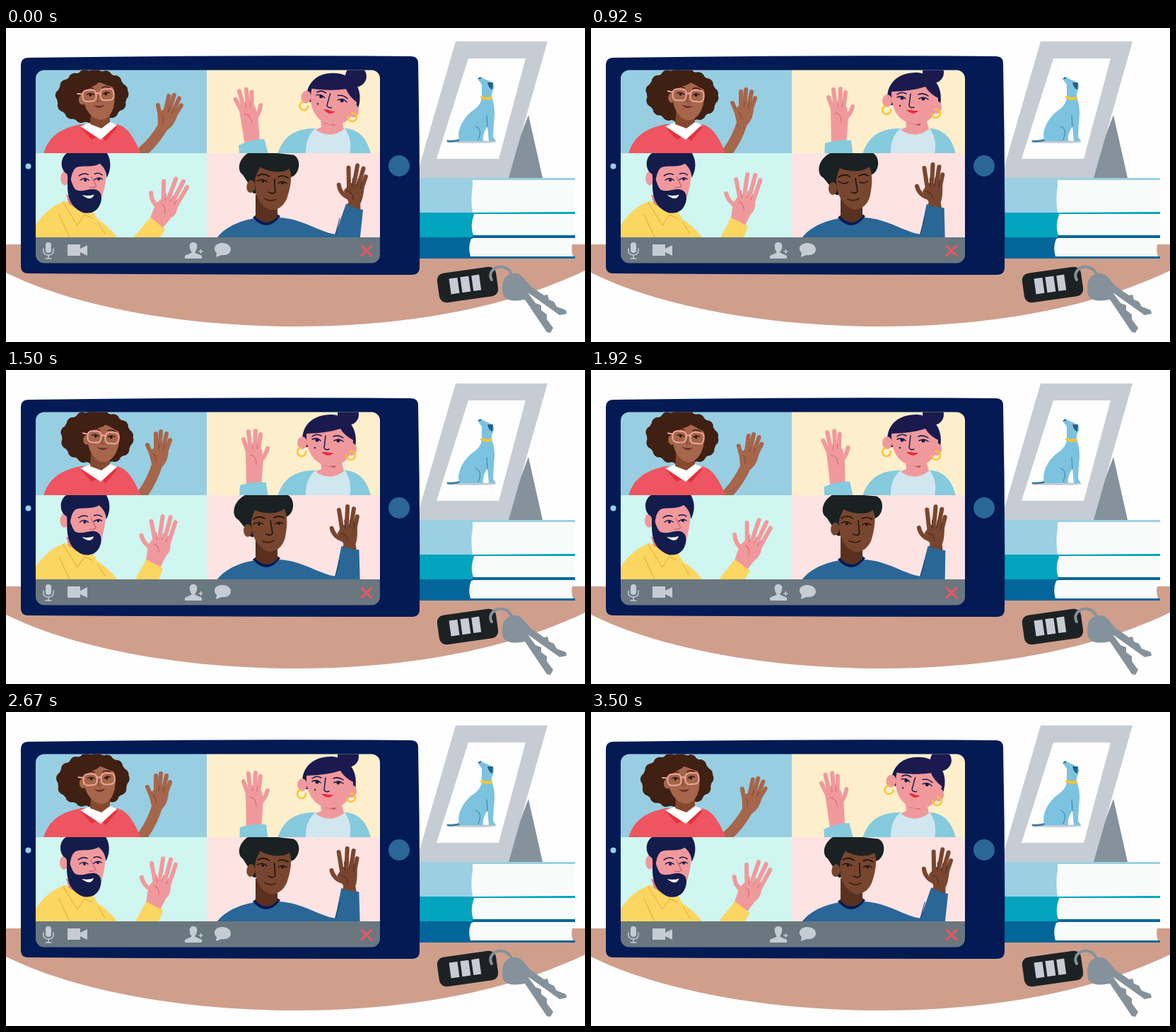
Recreate the animation shown at these times as an HTML page. Size 819 by 444 pixels, loop 3540 ms.

```html
<!DOCTYPE html>
<html lang="en">
<head>
<meta charset="utf-8">
<title>Video call</title>
<style>
html, body { margin: 0; width: 100%; height: 100%; overflow: hidden; background: #fefefe; }
svg { display: block; width: 819px; height: 444px; }
.line { fill: none; stroke-linecap: round; stroke-linejoin: round; }
.fingers { fill: none; stroke-linecap: round; stroke-width: 6; }
.dark { stroke: #141c4c; stroke-width: 1.5; }
</style>
</head>
<body>
<svg viewBox="0 0 819 444">
<defs>
  <clipPath id="screen"><rect x="42" y="59.5" width="487" height="273" rx="12"/></clipPath>
  <clipPath id="c1"><path d="M42 59H284V177H42z"/></clipPath>
  <clipPath id="c2"><path d="M284 58H529V177H284z"/></clipPath>
  <clipPath id="c3"><path d="M42 177H284V296H42z"/></clipPath>
  <clipPath id="c4"><path d="M284 177H529V296H284z"/></clipPath>
</defs>

<!-- Desk -->
<path fill="#cf9f8c" d="M0 306H819V343C700 400 550 422 410 422S110 400 0 346z"/>

<!-- Picture frame -->
<path fill="#85929b" d="M739 123L759 212H705z"/>
<path fill="#c5ccd4" d="M636 19H766L711 212H580z"/>
<path fill="#fefefe" d="M654 43H735L697 185H609z"/>
<ellipse cx="661" cy="161" rx="33" ry="2" fill="#c5ccd4"/>
<path class="line" stroke="#3b7ea1" stroke-width="3" d="M645 157Q636 161 625 160"/>
<path fill="#7cc3df" d="M667 72L672 69C677 74 688 74 690 81C691 87 686 90 687 98C691 108 692 120 690 134L689 154L693 160H683L681 139C676 147 674 153 675 160H642C636 148 646 127 660 117C669 111 674 104 673 93L673 80z"/>
<path class="line" stroke="#3b7ea1" d="M664 139Q675 142 668 158M680 124L681 140"/>
<path fill="#2b5f86" d="M681 77L689 77L688 87Q683 86 681 77zM667 72L671 69L672 72z"/>
<path class="line" stroke="#f7c531" stroke-width="4" d="M673 98Q680 101 686 99"/>

<!-- Books -->
<path fill="#9ad0e2" d="M580 212H805V215H660V262H580z"/>
<path fill="#f9fafa" d="M662 215H805V260H660Q656 238 662 215z"/>
<path fill="#02a4be" d="M580 261H660L805 260V263H662V296H580z"/>
<path fill="#f9fafa" d="M662 264H805V293H661Q656 279 662 264z"/>
<path fill="#02669a" d="M580 296H660V293H805V297H660V323H805V326H580z"/>
<path fill="#f9fafa" d="M658 298H805V306H801Q799 315 802 323H657Q653 310 658 298z"/>

<!-- Keys -->
<g transform="rotate(-8 653 363)">
  <rect x="611" y="342" width="84" height="42" rx="10" fill="#1c2224"/>
  <path fill="#c5ccd4" d="M628 351H640V373H628zM644 351H656V373H644zM660 351H671V373H660z"/>
</g>
<path class="line" stroke="#85929b" stroke-width="4" d="M687 356C681 345 692 336 703 338C714 341 718 350 714 360"/>
<path fill="#85929b" d="M706 353C713 345 724 345 731 352L742 365L761 378L766 377L768 384L775 387L779 394L792 399L793 404L783 406L738 374L749 389L757 392L757 399L765 405L765 412L774 424L770 431L765 430L734 384C724 386 707 388 703 377C701 367 702 358 706 353z"/>

<!-- Tablet -->
<path fill="#031a54" d="M32 42Q300 38 573 40Q583 40 583 50Q586 195 585 338Q585 349 574 349Q300 349 31 347Q21 347 21 336V53Q21 42 32 42z"/>
<circle cx="31.500" cy="195.500" r="4" fill="#9ad0e2"/>
<circle cx="556" cy="195" r="15" fill="#2a6796"/>

<g clip-path="url(#screen)">
  <path fill="#98cee1" d="M42 59H284V177H42z"/>
  <path fill="#fdefcb" d="M284 59H529V177H284z"/>
  <path fill="#cff6f0" d="M42 177H284V296H42z"/>
  <path fill="#fde3e2" d="M284 177H529V296H284z"/>

  <!-- Woman with glasses -->
  <g clip-path="url(#c1)">
    <g id="head1hair">
      <ellipse cx="125" cy="96" rx="43" ry="30" fill="#3f2013" stroke="#3f2013" stroke-width="13"/>
      <ellipse class="line" cx="125" cy="96" rx="43" ry="30" stroke="#3f2013" stroke-width="18" stroke-dasharray="0 15"/>
    </g>
    <g id="arm1">
      <path class="line" stroke="#a5664b" stroke-width="15" d="M194 174Q207 156 214 133"/>
      <path fill="#a5664b" d="M202 117L211 108L230 111Q230 128 221 137H207z"/>
      <path class="fingers" stroke="#a5664b" d="M208 124L200 106M212 113L212 90M217 112L219 87M222 113L227 90M226 116L232 99"/>
      <path class="line" stroke="#7c452f" d="M208 118Q213 122 212 129M216 112L217 104M222 113L224 106"/>
    </g>
    <path fill="#ee5560" d="M53 178C60 154 76 142 106 136H156C174 139 183 160 191 178z"/>
    <path fill="#e2323f" d="M105 140L121 158L133 152L141 160L158 140z"/>
    <path fill="#fff" d="M105 139L121 133H147L157 137L134 158z"/>
    <path fill="#84492f" d="M121 110H147V133L135 142L119 136z"/>
    <g id="head1">
      <path fill="#a5664b" d="M112 85C112 73 124 78 135 74C149 78 158 80 157 96C157 116 148 130 136 130C122 129 112 112 112 94z"/>
      <ellipse cx="111" cy="100" rx="5" ry="7" fill="#a5664b"/>
      <path fill="#3f2013" d="M108 86C115 68 145 66 160 86C148 84 143 78 136 77C128 84 119 82 112 92z"/>
      <g fill="#261511"><circle cx="123" cy="94" r="2"/><circle cx="145" cy="94" r="2"/></g>
      <path class="line" stroke="#3f2013" stroke-width="1.500" d="M117 86Q123 82 128 85M140 85Q146 82 151 86M118 93Q123 90 128 94M141 94Q145 90 150 93"/>
      <g class="line" stroke="#f0a59c" stroke-width="2"><rect x="112" y="87" width="19" height="16" rx="6"/><rect x="137" y="87" width="19" height="16" rx="6"/><path d="M131 93Q134 91 137 93M112 92L105 91"/></g>
      <path class="line" stroke="#75402b" d="M134 96L132 104H137"/>
      <path fill="#6f2f2a" d="M126 109Q134 111 142 109Q135 117 126 109z"/>
    </g>
  </g>

  <!-- Woman with bun -->
  <g clip-path="url(#c2)">
    <g id="arm2">
      <path fill="#f0999d" d="M339 115L350 107L362 112L364 126L361 166H340z"/>
      <path class="fingers" stroke="#f0999d" d="M343 118L336 98M346 113L343 87M352 112L353 86M357 114L360 91M359 129Q367 122 370 111"/>
      <path class="line" stroke="#cf6871" d="M345 120Q354 121 354 134M349 112L349 104M355 112L356 105"/>
      <path fill="#85cadd" d="M331 163Q350 157 368 159L371 182H330z"/>
    </g>
    <path fill="#85cadd" d="M384 178C392 154 408 142 436 142H481C501 144 511 158 516 178z"/>
    <path fill="#d0e7f0" d="M424 178Q423 153 439 141L477 139Q491 156 486 178z"/>
    <path fill="#f0999d" d="M444 120H472L478 143Q459 158 438 144L446 140z"/>
    <path fill="#9d5a58" d="M447 134Q461 136 471 128L465 138z"/>
    <g id="head2">
      <circle cx="484" cy="63" r="15" fill="#1b1a4f"/>
      <path fill="#1b1a4f" d="M419 101C418 76 437 62 462 63C488 66 498 86 494 109H424z"/>
      <ellipse cx="419" cy="103" rx="7" ry="9" fill="#f0999d"/>
      <ellipse cx="489" cy="112" rx="7" ry="9" fill="#f0999d"/>
      <path fill="#f0999d" d="M425 90Q455 89 473 83Q479 93 491 99C491 124 476 136 458 136C438 134 424 118 425 90z"/>
      <path class="line" stroke="#f7c531" stroke-width="2.500" d="M417 110A6 6 0 1 0 424 115M487 115A6 6 0 1 1 482 121"/>
      <path class="line dark" d="M433 94Q439 89 446 93M463 94Q470 91 477 96M452 93L450 110Q452 114 457 112"/>
      <path class="line dark" stroke-width="2" d="M433 98Q440 95 445 100M464 100Q471 96 477 101"/>
      <g fill="#141c4c"><circle cx="440" cy="99" r="2.500"/><circle cx="470" cy="100" r="2.500"/><circle cx="437" cy="110" r="1.200"/></g>
      <path fill="#e8293b" d="M446 116L453 116L456 117L463 117Q456 125 446 116z"/>
    </g>
  </g>

  <!-- Bearded man -->
  <g clip-path="url(#c3)">
    <g id="arm3">
      <path fill="#f0999d" d="M201 247L210 235L231 240Q235 255 226 263L218 279L197 274z"/>
      <path class="fingers" stroke="#f0999d" d="M206 252Q194 246 191 234M211 244L205 214M216 241L221 207M223 242L232 208M229 246L239 215"/>
      <path class="line" stroke="#cf6871" d="M209 246Q216 248 216 258M213 240L212 230M220 240L222 231M226 243L229 235"/>
      <path fill="#fbd661" d="M198 268L222 280L214 302H180z"/>
    </g>
    <path fill="#fbd661" d="M42 296V278C54 261 68 249 84 245L123 259L129 270Q146 281 158 297z"/>
    <path fill="#dd7d86" d="M85 235L117 255L114 266L90 252z"/>
    <path fill="#fbd661" d="M82 244L110 262L124 258V272L111 266L101 283L77 251z"/>
    <path class="line" stroke="#dba83a" d="M81 247L101 279L111 264L122 269M75 264L90 296M130 275L140 291"/>
    <g id="head3">
      <ellipse cx="82" cy="213" rx="6" ry="10" fill="#f0999d"/>
      <path fill="#f0999d" d="M86 190H138Q143 208 137 231C134 250 122 258 108 260C96 253 86 240 86 220z"/>
      <path fill="#141c4c" d="M86 207C91 211 92 224 98 229C110 233 116 226 126 228C135 230 136 240 133 248C128 263 112 264 103 258C91 251 86 239 86 220z"/>
      <path fill="#141c4c" d="M77 192C77 183 83 176 90 175H140C148 186 147 201 141 211C141 202 137 196 131 191C120 198 104 193 97 198C91 204 92 211 89 221L85 207C80 204 77 199 77 192z"/>
      <path fill="#fff" d="M107 236Q116 238 124 235Q120 246 107 236z"/>
      <path class="line dark" d="M102 209Q108 204 115 207M124 206Q130 203 135 207"/>
      <path class="line" stroke="#cf6871" stroke-width="1.500" d="M120 210L127 223Q124 226 118 225"/>
      <g id="open3" class="line dark"><path d="M104 215Q110 210 116 215M124 214Q130 209 135 213"/><path stroke-width="4" d="M111 215V215.100M130 213V213.100"/></g>
      <path id="shut3" class="line dark" d="M104 214Q110 219 116 215M124 214Q130 217 135 212"/>
    </g>
  </g>

  <!-- Man in blue -->
  <g clip-path="url(#c4)">
    <path fill="#2a6796" d="M298 297C312 279 334 272 353 269L386 268C421 270 441 288 467 292L480 300H298z"/>
    <g id="arm4">
      <path fill="#78462f" d="M468 231L476 219L496 221Q497 238 494 246L496 258H474L477 246z"/>
      <path class="fingers" stroke="#78462f" d="M476 240Q463 236 460 224M475 228L470 198M481 224L482 193M487 224L491 196M492 228L496 207"/>
      <path class="line" stroke="#482619" d="M473 231Q482 232 483 242M479 224L478 212M485 223L486 212M491 225L492 215"/>
      <path fill="#2a6796" d="M474 249Q488 254 499 254L501 305H462L468 280z"/>
    </g>
    <path class="line" stroke="#173d70" d="M466 292L472 269"/>
    <path fill="#031a54" d="M349 268Q369 291 388 266L382 262L354 264z"/>
    <path fill="#5a301f" d="M353 235L384 240L384 267Q369 283 353 267z"/>
    <g id="head4">
      <path fill="#192122" d="M329 212C318 207 320 185 340 176H397C410 181 408 202 398 207L360 215L350 236Q343 238 337 222z"/>
      <ellipse cx="342" cy="227" rx="6" ry="9" fill="#78462f"/>
      <path fill="#78462f" d="M347 213Q349 205 352 198C367 205 387 203 393 196C399 204 398 221 395 236C392 250 382 257 373 257C357 253 348 237 347 218z"/>
      <path class="line" stroke="#251712" stroke-width="1.800" d="M350 211Q358 205 366 210M379 209Q386 205 393 209M374 213L377 231Q374 235 368 232"/>
      <g id="open4" class="line" stroke="#251712" stroke-width="1.500"><path d="M350 218Q357 213 364 218M380 218Q386 213 392 217"/><path stroke-width="4" d="M358 218V218.100M386 217V217.100"/></g>
      <path id="shut4" class="line" stroke="#251712" stroke-width="1.500" d="M350 217Q357 222 364 218M380 218Q386 221 392 216"/>
      <path class="line" stroke="#401e16" stroke-width="1.800" d="M363 242Q372 246 379 241"/>
    </g>
  </g>

  <!-- Call controls -->
  <path fill="#6a777f" d="M42 296H529V333H42z"/>
  <g fill="#c5ccd4">
    <rect x="56" y="303" width="8" height="15" rx="4"/>
    <path class="line" stroke="#c5ccd4" stroke-width="1.500" d="M53 312V315Q53 321 60 321T67 315V312M60 321V326M56 326H64"/>
    <path d="M87 306H105V312L115 307V322L105 317V322H87z"/>
    <path d="M265 303C270 303 271 307 270 311C269 316 266 317 268 318L277 322V326H253V322L262 318C264 317 260 315 260 310C259 306 261 303 265 303z"/>
    <path class="line" stroke="#c5ccd4" stroke-width="1.500" d="M273 316H278M275.500 313.500V318.500"/>
    <path d="M306 304C313 304 318 308 318 313C318 319 312 322 305 321L297 324L298 318C291 311 297 304 306 304z"/>
  </g>
  <path class="line" stroke="#ee5560" stroke-width="3" d="M503 308L517 322M517 308L503 322"/>
</g>
</svg>
<script>
const LOOP = 3540, WAVE = LOOP / 6;
const el = id => document.getElementById(id);

const ease = x => {
  const p = Math.min(1, Math.max(0, x));
  return p * p * (3 - 2 * p);
};
// 0 at rest, 1 between the start of the lean and the start of the return
const lean = (t, out, back, time = 340) => ease((t - out) / time) - ease((t - back) / time);
// 0..1 swing, delayed by a fraction of one wave
const swing = (t, delay) => (1 + Math.cos(2 * Math.PI * (t / WAVE - delay))) / 2;

const turn = (id, angle, x, y) => el(id).setAttribute("transform", `rotate(${angle} ${x} ${y})`);

function blink(n, shut) {
  el("open" + n).style.display = shut ? "none" : "";
  el("shut" + n).style.display = shut ? "" : "none";
}

function draw(t) {
  turn("arm1", 13 * swing(t, 0.03), 194, 174);
  turn("arm2", -8.5 * swing(t, 0.055), 351, 178);
  turn("arm3", 14 * swing(t, 0.1), 202, 297);
  turn("arm4", 8.5 * swing(t, -0.04), 481, 297);

  const tilt1 = -4 + 8 * lean(t, 90, 2420);
  turn("head1hair", tilt1, 132, 146);
  turn("head1", tilt1, 132, 146);
  turn("head2", 9 * (1 - lean(t, 570, 2670, 300)), 456, 135);
  turn("head3", 1.5 * (1 - lean(t, 1300, 3150)), 105, 258);
  turn("head4", 6.5 * (1 - lean(t, 120, 1700)), 370, 264);

  blink(3, t > 400 && t < 600);
  blink(4, t > 840 && t < 1030);
}

function frame() {
  draw(performance.now() % LOOP);
  requestAnimationFrame(frame);
}
frame();
</script>
</body>
</html>
```
